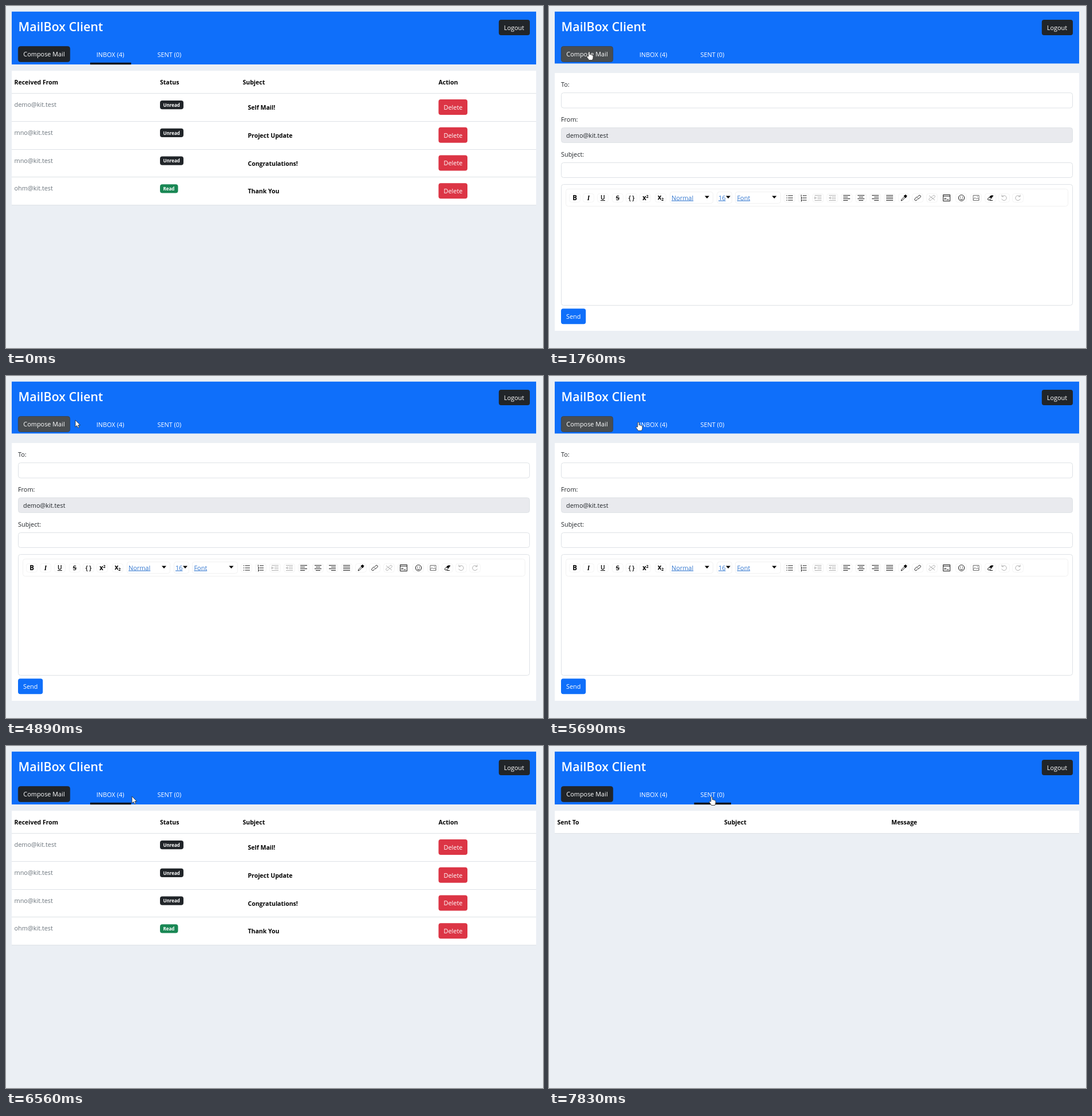
Recreate the animation shown at these times as an HTML page. Size 938 by 597 pixels, loop 7990 ms.

```html
<!DOCTYPE html>
<html lang="en">
<head>
<meta charset="utf-8">
<title>Mail client</title>
<style>
  html, body { margin: 0; width: 100%; height: 100%; overflow: hidden; background: #ebeff4; }
  svg { display: block; }
  text { font: 10.9px "Open Sans", "Noto Sans", sans-serif; fill: #212529; white-space: pre; }
  .title { font-size: 21.4px; font-weight: 600; fill: #fff; }
  .white { fill: #fff; }
  .bold { font-size: 10.5px; font-weight: 700; fill: #000; }
  .muted { fill: #6c757d; }
  .badge { font-size: 8px; font-weight: 700; fill: #fff; }
  .link { fill: #3478d0; text-decoration: underline; }
  .icon { fill: none; stroke: #111; stroke-width: .95; }
  .icon.off { stroke: #aaa; }
  .glyph { font-size: 11.5px; font-weight: 700; fill: #000; text-anchor: middle; }
  .cursor { fill: #fff; stroke: #222; stroke-width: .8; stroke-linejoin: round; }
</style>
</head>
<body>
<svg id="stage" width="938" height="597" viewBox="0 0 938 597"></svg>
<script>
const LOOP = 7990;
const DARK = '#212529', BLUE = '#0f6ffa';

const rect = (x, y, w, h, fill, extra = '') =>
  `<rect x="${x}" y="${y}" width="${w}" height="${h}" fill="${fill}" ${extra}/>`;
const text = (x, y, s, cls = '') => `<text x="${x}" y="${y}" class="${cls}">${s}</text>`;
const button = (x, y, w, label, fill, extra = '') =>
  rect(x, y, w, 27, fill, `rx="4" ${extra}`) + text(x + 9, y + 17.8, label, 'white');
const field = (x, y, w, h, fill = '#fff', stroke = '#dee2e6') =>
  rect(x + .5, y + .5, w - 1, h - 1, fill, `rx="4" stroke="${stroke}"`);
const heads = list => rect(10, 113, 916, 39, '#fff') + rect(10, 152, 916, 1, '#dee2e6') +
  list.map(([x, s]) => text(x, 137, s, 'bold')).join('');

function inbox() {
  const mails = [
    ['demo@kit.test', 'Self Mail!'], ['mno@kit.test', 'Project Update'],
    ['mno@kit.test', 'Congratulations!'], ['ohm@kit.test', 'Thank You', true]
  ];
  return rect(10, 113, 916, 235, '#fff') +
    heads([[14.5, 'Received From'], [269, 'Status'], [413.5, 'Subject'], [755.5, 'Action']]) +
    mails.map(([from, subject, read], i) => {
      const y = 152 + i * 48.75;
      return text(14.5, y + 24, from, 'muted') +
        rect(269, y + 13, read ? 31.5 : 41, 15.2, read ? '#198754' : DARK, 'rx="4"') +
        text(274.5, y + 23.8, read ? 'Read' : 'Unread', 'badge') +
        text(422.5, y + 29, subject, 'bold') +
        button(755.5, y + 11, 50.5, 'Delete', '#dc3545') +
        rect(10, Math.round(y + 48.75), 916, 1, '#dee2e6');
    }).join('');
}

// Icons are drawn around their own centre.
const icon = (x, d, off) => `<path class="icon ${off ? 'off' : ''}" transform="translate(${x} 335)" d="${d}"/>`;
const lines = (...spans) => spans.map(([a, b], i) => `M${a} ${i * 3 - 4.5}H${b}`).join('');
const caret = x => `<path d="M${x - 4} 331.5h8l-4 4.5z"/>`;
const small = (dy, s) => `<tspan dy="${dy}" font-size="7">${s}</tspan>`;

function toolbar() {
  const slots = [45, 69, 94, 120, 144, 168, 195, 420, 445, 470, 495, 520, 545, 570, 595,
    620, 644, 669, 694, 720, 746, 771, 795, 819];
  const indent = lines([-6, 6], [-1, 6], [-1, 6], [-6, 6]);
  const chain = 'M.5 -2.5L2 -4A1.9 1.9 0 0 1 4.7 -1.3L2.4 1A1.9 1.9 0 0 1 -.3 1' +
    'M-.5 2.5L-2 4A1.9 1.9 0 0 1 -4.7 1.3L-2.4 -1A1.9 1.9 0 0 1 .3 -1';
  return field(29, 319, 878, 31, '#fff', '#f1f1f1') +
    slots.map(x => field(x - 10, 327, 20, 16, '#fff', '#f4f4f4')).join('') +
    text(45, 339, 'B', 'glyph') +
    text(69, 339, '<tspan font-style="italic" font-family="Liberation Serif, serif">I</tspan>', 'glyph') +
    text(94, 338, '<tspan font-weight="600" font-size="10.5" text-decoration="underline">U</tspan>', 'glyph') +
    text(120, 339, '<tspan font-weight="600" text-decoration="line-through">S</tspan>', 'glyph') +
    text(144, 338.5, '<tspan font-weight="600" font-size="10.5">{ }</tspan>', 'glyph') +
    text(168.5, 339, 'x' + small(-4, '2'), 'glyph') +
    text(195, 338, 'x' + small(2, '2'), 'glyph') +
    field(211, 324, 76, 21, '#fff', '#f1f1f1') + text(214, 338.5, 'Normal', 'link') + caret(276) +
    field(293, 324, 27, 21, '#fff', '#f1f1f1') + text(296, 338.5, '16', 'link') + caret(313) +
    field(325, 324, 80, 21, '#fff', '#f1f1f1') + text(328.5, 338.5, 'Font', 'link') + caret(393.5) +
    icon(420, 'M-2.5 -4H6M-2.5 0H6M-2.5 4H6M-5.5 -4h1.6M-5.5 0h1.6M-5.5 4h1.6') +
    icon(445, 'M-2 -4H5M-2 0H5M-2 4H5M-4.5 -5.5v3M-5 -1h1.5v2H-5M-5 3h1.5v2.5H-5') +
    icon(470, indent + 'M-6 -2l3 2l-3 2z', true) +
    icon(495, indent + 'M-3 -2l-3 2l3 2z', true) +
    icon(520, lines([-6, 6], [-6, 2], [-6, 6], [-6, 2])) +
    icon(545, lines([-6, 6], [-4, 4], [-6, 6], [-4, 4])) +
    icon(570, lines([-6, 6], [-2, 6], [-6, 6], [-2, 6])) +
    icon(595, lines([-6, 6], [-6, 6], [-6, 6], [-6, 6])) +
    icon(620, 'M-5 5L-4 2.5L1 -2.5L2.5 -1L-2.5 4z') +
    '<path d="M620 331.5l3-2 2 2-2 3.5z" stroke="#111"/>' +
    icon(644, chain) + icon(669, chain + 'M-5 -4L5 4', true) +
    icon(694.5, 'M-6 -5.5H6V5.5H-6zM-6 -3H6M-3 0l-1 3M-1 0l-1 3M0 3H4') +
    icon(720.5, 'M-5.2 0A5.2 5.2 0 1 1 5.2 0A5.2 5.2 0 1 1 -5.2 0M-2.8 1.3Q0 4.6 2.8 1.3M-2 -2.2v1.6M2 -2.2v1.6') +
    `<g opacity=".65">${icon(746, 'M-5 -4.5H5V4.5H-5zM-5 3L-2 -.5L.5 2L2.5 0L5 3M1.5 -2.5h1.5')}</g>` +
    icon(771, 'M-5 2L1 -4H5L-.5 3.5H-4zM-1 4.5H4') + '<path d="M769 334l3-3h4l-4 4.5z"/>' +
    icon(795, 'M-3.6 -2.4A4.3 4.3 0 1 1 -4.2 1.6M-4 -5.5V-2.2H-.7', true) +
    icon(819, 'M3.6 -2.4A4.3 4.3 0 1 0 4.2 1.6M4 -5.5V-2.2H.7', true);
}

const compose = () => rect(10, 117, 916, 450, '#fff') +
  text(21, 141, 'To:') + field(21, 151, 894, 27.5) +
  text(21, 202, 'From:') + field(21, 212, 894, 27, '#e9eaee') + text(30, 229.5, 'demo@kit.test') +
  text(21, 263, 'Subject:') + field(21, 273, 894, 27) +
  field(21, 311, 894, 212) + toolbar() +
  button(21, 528.3, 43.3, 'Send', BLUE);

const sent = () => heads([[14.5, 'Sent To'], [306, 'Subject'], [598, 'Message']]);

const HAND = 'M-1.2 9V1.6a1.3 1.3 0 0 1 2.5 0v4.2c1-.5 2-.2 2.2.5c.9-.3 1.8 0 2 .7c1-.2 1.6.3 1.6 1.2' +
  'v3c0 2-1.2 2.6-1.4 4.3H-.2c-.4-1.6-2.6-3.2-3.8-5.6c-.6-1.3.9-2 1.8-.9z';
const ARROW = 'M0 0V12L2.8 9.4L4.6 13.4L6.6 12.5L4.9 8.7H8.6z';

const $ = id => document.getElementById(id);
$('stage').innerHTML =
  rect(10, 9.8, 916, 92, BLUE, 'id="bar"') +
  text(21.5, 43.5, 'MailBox Client', 'title') +
  button(860.8, 24, 54.2, 'Logout', DARK) +
  button(21.3, 70.5, 90.4, 'Compose Mail', DARK, 'id="write" stroke-width=".7"') +
  text(158, 89, 'INBOX (4)', 'white') + text(264.5, 89, 'SENT (0)', 'white') +
  rect(147, 98.8, 71.5, 3.4, '#101316', 'id="inboxLine"') +
  rect(253.5, 98.8, 64.5, 3.4, '#101316', 'id="sentLine"') +
  `<g id="inbox">${inbox()}</g><g id="compose">${compose()}</g><g id="sent">${sent()}</g>` +
  '<path id="cursor" class="cursor"/>';

// Pointer paths: time, x, y of the tip; the pointer is hidden between paths.
const paths = [
  [[820, 72, 2], [1050, 73, 68], [1190, 73, 68], [1200, 71, 72], [1440, 70, 79], [3660, 70, 79]],
  [[4890, 121, 77], [5280, 152, 80], [5600, 152, 80], [5690, 156, 80], [6000, 156, 80],
    [6710, 237, 90], [6790, 241, 90], [7340, 284, 88], [LOOP, 284, 88]]
];

function pointer(t) {
  const path = paths.find(p => t >= p[0][0] && t < p[p.length - 1][0]);
  if (!path) return null;
  const i = path.findIndex(p => p[0] > t);
  const [t0, x0, y0] = path[i - 1], [t1, x1, y1] = path[i];
  const k = (t - t0) / (t1 - t0);
  return [x0 + (x1 - x0) * k, y0 + (y1 - y0) * k];
}

// Short transition as the screen recorder caught it, in 80 ms steps.
const fade = (t, start) => t < start ? 0 : Math.min(1, .27 + .53 * Math.floor((t - start) / 80));
const mix = (a, b, k) => `rgb(${a.map((v, i) => Math.round(v + (b[i] - v) * k))})`;

function draw(t) {
  const view = t < 1760 ? 'inbox' : t < 5920 ? 'compose' : t < 7660 ? 'inbox' : 'sent';
  for (const id of ['inbox', 'compose', 'sent']) $(id).style.display = id === view ? '' : 'none';
  $('bar').setAttribute('height', view === 'compose' ? 90.6 : 92.2);
  $('inboxLine').setAttribute('opacity', view !== 'inbox' ? 0 : t < 1760 ? 1 : fade(t, 5920));
  $('sentLine').setAttribute('opacity', fade(t, 7660));

  const hover = fade(t, 1200) - fade(t, 5920);
  $('write').setAttribute('fill', mix([33, 37, 41], [73, 77, 80], hover));
  $('write').setAttribute('stroke', mix([33, 37, 41], [55, 59, 62], hover));

  const tip = pointer(t);
  $('cursor').style.display = tip ? '' : 'none';
  if (tip) {
    const [x, y] = tip;
    const over = y > 70 && (x > 21 && x < 112 || x > 147 && x < 218 || x > 254 && x < 318);
    $('cursor').setAttribute('d', over ? HAND : ARROW);
    $('cursor').setAttribute('transform', `translate(${x} ${y})`);
  }
}

function tick(now) {
  draw(now % LOOP);
  requestAnimationFrame(tick);
}
draw(0);
requestAnimationFrame(tick);
</script>
</body>
</html>
```
